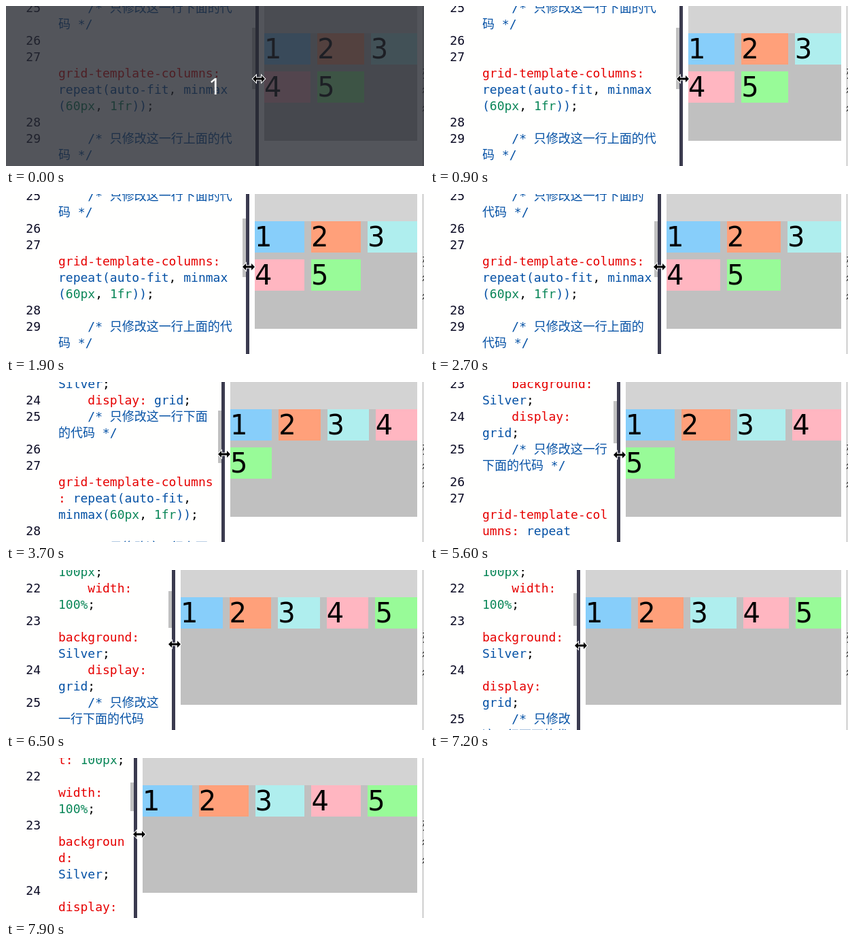
An HTML page that plays this animation: 615 px wide and 235 px high, repeating every 8000 ms.

```html
<!DOCTYPE html>
<html lang="zh">
<head>
<meta charset="utf-8">
<style>
html, body { margin: 0; width: 100%; height: 100%; overflow: hidden; background: #fff; }
#stage { position: relative; width: 615px; height: 235px; overflow: hidden; background: #fff; }
#stage div, #cursor { position: absolute; }
#editor { left: 0; top: 0; height: 235px; overflow: hidden; background: #fffffe;
  font: 18px/24px "DejaVu Sans Mono", "Noto Sans CJK SC", "Noto Sans CJK", monospace; color: #000; }
#editor div { left: 77px; height: 24px; white-space: pre; }
#editor div.num { left: 0; width: 51px; text-align: right; color: #0a0a23; }
#thumb { width: 5px; background: #c1c1c1; }
#bar { top: 0; width: 5px; height: 235px; background: #3b3b4f; }
#upper { top: 0; right: 10px; height: 40px; background: LightGray; }
#stage #grid { top: 40px; right: 10px; height: 158px; background: Silver; display: grid;
  grid-template-columns: repeat(auto-fit, minmax(60px, 1fr)); grid-template-rows: 1fr 1fr 1fr;
  gap: 10px; font: 40px/46px "DejaVu Sans", sans-serif; color: #000; }
#grid span { min-width: 0; }
#edge { left: 613px; top: 0; width: 1px; height: 235px; background: #a9a9a9; }
#side { left: 612px; top: 85px; width: 16px; font: 16px/27px "Noto Sans CJK SC", "Noto Sans CJK", sans-serif; color: #333; }
#shade { inset: 0; background: rgba(38, 40, 48, .79); }
#count { inset: 0; text-align: center; font: 32px/235px "Noto Sans", sans-serif; color: #fff; }
#cursor { left: -12px; top: -8px; }
</style>
</head>
<body>
<div id="stage">
  <div id="editor"></div>
  <div id="thumb"></div>
  <div id="bar"></div>
  <div id="upper"></div>
  <div id="grid">
    <span style="background:LightSkyBlue">1</span>
    <span style="background:LightSalmon">2</span>
    <span style="background:PaleTurquoise">3</span>
    <span style="background:LightPink">4</span>
    <span style="background:PaleGreen">5</span>
  </div>
  <div id="edge"></div>
  <div id="side">列<br>行<br>行</div>
  <div id="shade"></div>
  <div id="count">1</div>
  <svg id="cursor" width="24" height="16" viewBox="-12 -8 24 16">
    <path d="M-9 0L-4-5V-1.5H4V-5L9 0L4 5V1.5H-4V5Z" stroke="#fff" stroke-width="2" paint-order="stroke"/>
  </svg>
</div>
<script>
const $ = id => document.getElementById(id);
const LOOP = 8000, CHAR = 10.837, FULL = 18 / CHAR, TEXT_X = 77, ROW = 24;
const FIRST = 20, FIRST_Y = -129;
const lines = [
  "    font-size: 40px;",
  "    min-height: 100px;",
  "    width: 100%;",
  "    background: Silver;",
  "    display: grid;",
  "    /* 只修改这一行下面的代码 */",
  "",
  "    grid-template-columns: repeat(auto-fit, minmax(60px, 1fr));",
  "",
  "    /* 只修改这一行上面的代码 */",
];

// time, bar x, cursor x, cursor y, thumb top, thumb height
const keys = [
  [0, 367, 372, 107, 32, 90],
  [1300, 367, 372, 107, 32, 90],
  [2100, 348, 352, 107, 37, 85],
  [2200, 348, 352, 107, 37, 85],
  [2700, 335, 338, 107, 40, 82],
  [3700, 317, 321, 106, 42, 77],
  [4500, 301, 305, 107, 36, 71],
  [4600, 301, 305, 107, 36, 71],
  [5600, 275, 279, 107, 28, 62],
  [6500, 244, 248, 109, 31, 54],
  [7900, 188, 196, 112, 36, 42],
];

function pose(t) {
  let i = 1;
  while (i < keys.length - 1 && keys[i][0] < t) i++;
  const a = keys[i - 1], b = keys[i];
  const k = Math.min(1, (t - a[0]) / (b[0] - a[0]));
  return a.map((v, j) => Math.round(v + (b[j] - v) * k));
}

const wide = c => c > "\u2fff";

function canBreak(prev, cur) {
  const after = c => " }),;./".includes(c), before = c => "({".includes(c);
  return cur !== " " && (after(prev) && !after(cur) || before(cur) && !before(prev) ||
    wide(prev) && !after(cur) || wide(cur) && !before(prev));
}

// Start offsets of the wrapped rows of one line.
function wrap(line, cols) {
  const starts = [0];
  let width = 0, mark = 0, markWidth = 0;
  for (let i = 0; i < line.length; i++) {
    const w = wide(line[i]) ? FULL : 1;
    if (i && canBreak(line[i - 1], line[i])) { mark = i; markWidth = width; }
    width += w;
    if (width > cols) {
      const start = starts[starts.length - 1];
      if (mark <= start || width - markWidth > cols) { mark = i; markWidth = width - w; }
      starts.push(mark);
      width -= markWidth;
      markWidth = 0;
    }
  }
  return starts;
}

function colours(line) {
  const parts = line.match(/\/\*.*|^\s*[\w-]+:|\d+(?:px|fr|%)|[,;]|[^,;\d]+/g) || [];
  return parts.flatMap(p => Array(p.length).fill(
    p.startsWith("/*") ? "#008000" : p.endsWith(":") ? "#e60000" :
    /^\d/.test(p) ? "#098658" : /^[,;]/.test(p) ? "#000" : "#0451a5"));
}

function paint(line, from, to) {
  const ink = colours(line);
  let html = "";
  for (let i = from; i < to;) {
    let j = i + 1;
    while (j < to && ink[j] === ink[i]) j++;
    html += `<span style="color:${ink[i]}">${line.slice(i, j)}</span>`;
    i = j;
  }
  return html;
}

function layout(cols) {
  let y = FIRST_Y, html = "";
  lines.forEach((line, n) => {
    html += `<div class="num" style="top:${y}px">${FIRST + n}</div>`;
    wrap(line, cols).forEach((from, i, starts) => {
      const to = starts[i + 1] ?? line.length;
      html += `<div style="top:${y}px">${paint(line, from, to)}</div>`;
      y += ROW;
    });
  });
  $("editor").innerHTML = html;
}

let lastCols;
function draw() {
  const t = Math.floor(performance.now() % LOOP / 100) * 100;
  const [, x, cx, cy, top, height] = pose(t);
  const cols = Math.floor((x - 8.5 - TEXT_X) / CHAR);
  if (cols !== lastCols) layout(lastCols = cols);
  $("editor").style.width = $("bar").style.left = x + "px";
  $("upper").style.left = $("grid").style.left = x + 13 + "px";
  Object.assign($("thumb").style, { left: x - 5 + "px", top: top + "px", height: height + "px" });
  $("cursor").style.transform = `translate(${cx}px, ${cy}px)`;
  $("shade").style.opacity = $("count").style.opacity = Math.max(0, 1 - t / 900);
  requestAnimationFrame(draw);
}
draw();
</script>
</body>
</html>
```
